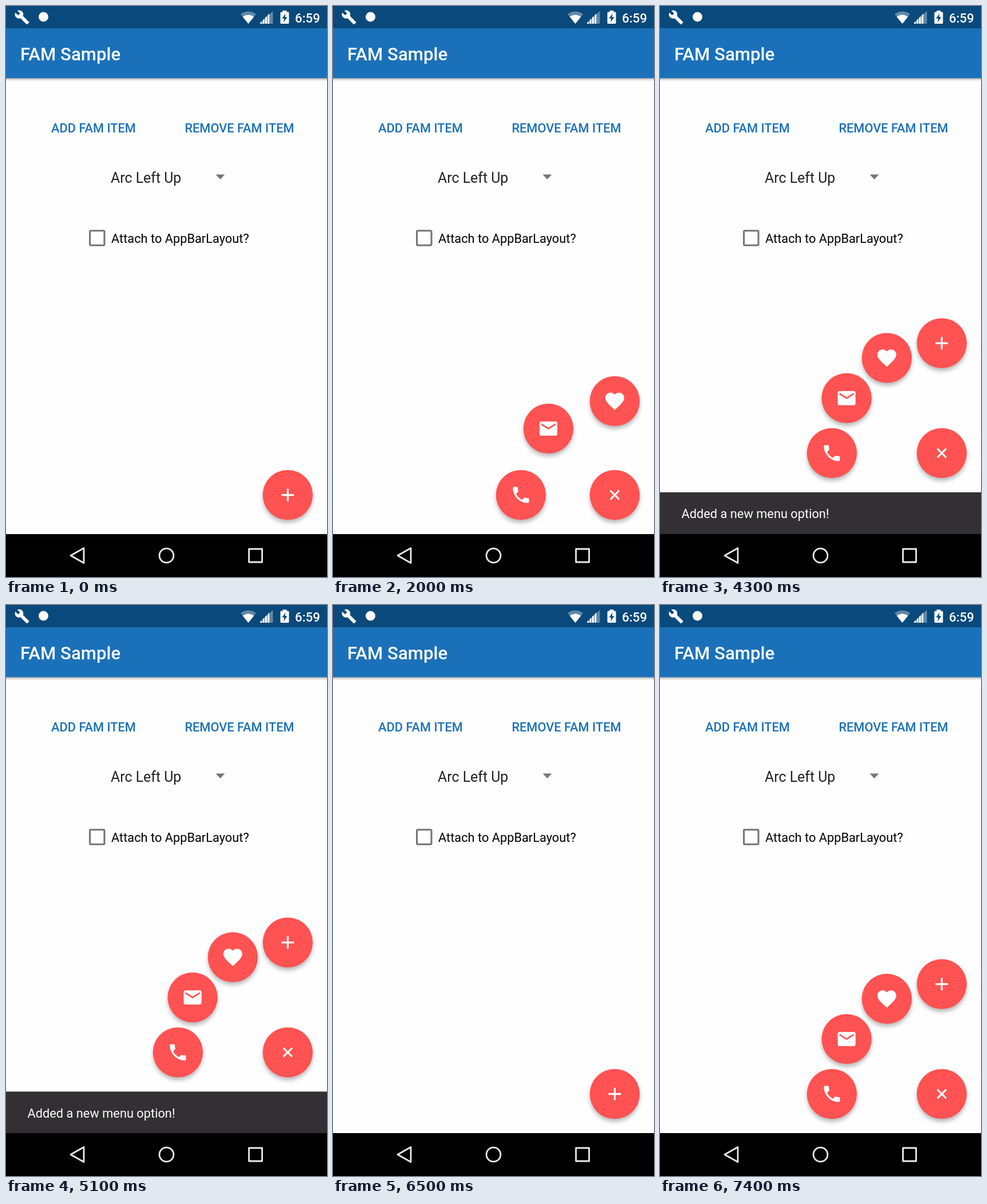
Write an HTML page that moves like this. It is 561 px wide and 998 px high and loops after 8 s.

```html
<!DOCTYPE html>
<html lang="en">
<head>
<meta charset="utf-8">
<title>FAM Sample</title>
<style>
  html, body { margin: 0; width: 100%; height: 100%; overflow: hidden; background: #fefefe; }
  svg { display: block; width: 100%; height: 100%; }
  text { font-family: Roboto, "Noto Sans", sans-serif; font-size: 21.8px; }
  .medium { font-weight: 500; }
  .action { font-weight: 500; fill: #1b71b9; text-anchor: middle; }
  .fab { filter: drop-shadow(0 5px 3.5px rgba(0, 0, 0, .27)); }
  .fab circle { fill: #ff5252; }
  .fab path { fill: #fff; }
</style>
</head>
<body>
<svg viewBox="0 0 561 998">
  <defs>
    <linearGradient id="shade" x2="0" y2="1">
      <stop stop-color="#000" stop-opacity=".36"/>
      <stop offset=".45" stop-color="#000" stop-opacity=".13"/>
      <stop offset="1" stop-color="#000" stop-opacity="0"/>
    </linearGradient>
    <path id="plus" d="M19 13h-6v6h-2v-6H5v-2h6V5h2v6h6z"/>
    <path id="heart" d="M12 21.35l-1.45-1.32C5.4 15.36 2 12.28 2 8.5 2 5.42 4.42 3 7.5 3c1.74 0 3.41.81 4.5 2.09C13.09 3.81 14.76 3 16.5 3 19.58 3 22 5.42 22 8.5c0 3.78-3.4 6.86-8.55 11.54z"/>
    <path id="mail" d="M20 4H4c-1.1 0-2 .9-2 2v12c0 1.1.9 2 2 2h16c1.1 0 2-.9 2-2V6c0-1.1-.9-2-2-2zm0 4l-8 5-8-5V6l8 5 8-5z"/>
    <path id="phone" d="M6.62 10.79c1.44 2.83 3.76 5.14 6.59 6.59l2.2-2.2c.27-.27.67-.36 1.02-.24 1.12.37 2.33.57 3.57.57.55 0 1 .45 1 1V20c0 .55-.45 1-1 1C10.61 21 3 13.39 3 4c0-.55.45-1 1-1h3.5c.55 0 1 .45 1 1 0 1.25.2 2.45.57 3.57.11.35.03.74-.25 1.02z"/>
  </defs>

  <rect width="561" height="998" fill="#fefefe"/>

  <!-- App bar -->
  <rect y="126" width="561" height="6" fill="url(#shade)"/>
  <rect width="561" height="126" fill="#1b71b9"/>
  <text class="medium" x="25" y="95" fill="#fff" style="font-size:31.2px">FAM Sample</text>

  <!-- Status bar -->
  <rect width="561" height="39" fill="#0a497b"/>
  <g fill="#fff">
    <path transform="translate(14.4 6.2) scale(1.13)" d="M22.7 19l-9.1-9.1c.9-2.3.4-5-1.5-6.9-2-2-5-2.4-7.4-1.3L9 6 6 9 1.6 4.7C.4 7.1.9 10.1 2.9 12.1c1.9 1.9 4.6 2.4 6.9 1.5l9.1 9.1c.4.4 1 .4 1.4 0l2.3-2.3c.5-.4.5-1.1.1-1.4z"/>
    <circle cx="65.5" cy="19" r="8.5"/>
    <g transform="translate(409.6 6.1) scale(1.16)">
      <path opacity=".35" d="M12 21.5L23.64 7C23.2 6.66 18.7 3 12 3S.8 6.66.36 7z"/>
      <path d="M3.53 10.95L12 21.5l8.47-10.55C20.04 10.62 16.8 8 12 8s-8.04 2.62-8.47 2.95z"/>
    </g>
    <path id="traffic" fill="#5c6f7e" d="M417.5 18.5l6-7 6 7zM417.5 21.5h12l-6 7z"/>
    <path opacity=".35" d="M444 31L466.5 8.5V31z"/>
    <path d="M444 31v-1.5l3-3V31zM448.4 31v-6l3-3v9zM452.8 31V20.6l3-3V31zM457.2 31V16.2l3-3V31z"/>
    <path d="M483.5 8h7v2.5h2.5q1.5 0 1.5 1.5v17.5q0 1.5-1.5 1.5h-12q-1.5 0-1.5-1.5V12q0-1.5 1.5-1.5h2.5z"/>
    <path fill="#0a497b" d="M488.6 13l-6.2 8.8h3.8l-1 6.7 6.4-9.3h-4z"/>
    <text class="medium" x="505" y="28.5" style="font-size:22.3px">6:59</text>
  </g>

  <!-- Controls -->
  <text class="action" x="153" y="220.5">ADD FAM ITEM</text>
  <text class="action" x="408" y="220.5">REMOVE FAM ITEM</text>
  <text x="183" y="309" fill="#212121" style="font-size:24.9px">Arc Left Up</text>
  <path d="M366.5 294.5h16l-8 8.5z" fill="#757575"/>
  <rect x="146.6" y="392.8" width="25.4" height="25.4" rx="1.5" fill="none" stroke="#757575" stroke-width="3.1"/>
  <text x="184" y="414" fill="#000">Attach to AppBarLayout?</text>

  <g id="menu"></g>

  <!-- Snackbar -->
  <g id="snack">
    <rect y="850" width="561" height="73.5" fill="#323033"/>
    <text id="note" x="37.5" y="895.3" fill="#fff">Added a new menu option!</text>
  </g>

  <!-- Navigation bar -->
  <rect y="923" width="561" height="75"/>
  <g fill="none" stroke="#ececec" stroke-width="2.8" stroke-linejoin="round">
    <path d="M113 960.5l23-13v26z"/>
    <circle cx="280.5" cy="960.5" r="12.4"/>
    <rect x="424.6" y="949" width="23" height="23"/>
  </g>
</svg>

<script>
const LOOP = 8000, TICK = 100;
const HOME = { x: 492.4, y: 854.6 };
const SNACK_HEIGHT = 73.2;
const SMALL_ARC = 164, LARGE_ARC = 192;
const byId = id => document.getElementById(id);

function makeFab(icon) {
  const fab = document.createElementNS('http://www.w3.org/2000/svg', 'g');
  fab.setAttribute('class', 'fab');
  fab.innerHTML = '<circle r="43.7"/>';
  const glyph = document.createElementNS('http://www.w3.org/2000/svg', 'g');
  const shape = byId(icon).cloneNode();
  shape.removeAttribute('id');
  shape.setAttribute('transform', `scale(${icon === 'heart' ? 1.65 : 1.558}) translate(-12 -12)`);
  glyph.append(shape);
  fab.append(glyph);
  byId('menu').append(fab);
  return { fab, glyph };
}

const items = ['phone', 'mail', 'heart', 'plus'].map(makeFab);
const main = makeFab('plus');

const span = (t, start, length) => Math.min(1, Math.max(0, (t - start) / length));
const mix = (a, b, k) => a + (b - a) * k;
const smooth = k => (1 - Math.cos(Math.PI * k)) / 2;
const overshoot = k => (k - 1) ** 2 * (3 * (k - 1) + 2) + 1;

// Cubic Bézier (.4, 0, .2, 1), solved for x by bisection.
function standard(x) {
  let lo = 0, hi = 1, u = x;
  for (let i = 0; i < 24; i++) {
    u = (lo + hi) / 2;
    const at = 1.2 * u * (1 - u) ** 2 + .6 * u * u * (1 - u) + u ** 3;
    if (at < x) lo = u; else hi = u;
  }
  return u * u * (3 - 2 * u);
}

function openness(t) {
  if (t < 5950) return overshoot(span(t, 450, 400));
  if (t < 6950) return 1 - smooth(span(t, 5950, 500));
  return overshoot(span(t, 6950, 400));
}

function turn(t) {
  return smooth(span(t, 450, 400)) - smooth(span(t, 5950, 500)) + smooth(span(t, 6950, 400));
}

function place(fab, x, y) {
  fab.setAttribute('transform', `translate(${x.toFixed(2)} ${y.toFixed(2)})`);
}

function draw(t) {
  const open = openness(t);
  const shown = standard(span(t, 2090, 250)) - standard(span(t, 5087, 250));
  const regroup = smooth(span(t, 2050, 400));
  const y = HOME.y - SNACK_HEIGHT * shown;

  items.forEach(({ fab }, i) => {
    const added = i === 3;
    const angle = mix(Math.min(i, 2) * 45, i * 30, regroup) * Math.PI / 180;
    const radius = open * mix(added ? 0 : SMALL_ARC, LARGE_ARC, regroup);
    place(fab, HOME.x - radius * Math.cos(angle), y - radius * Math.sin(angle));
    fab.style.display = radius > .01 ? '' : 'none';
  });

  place(main.fab, HOME.x, y);
  main.glyph.setAttribute('transform', `rotate(${45 * turn(t)})`);

  byId('snack').setAttribute('transform', `translate(0 ${SNACK_HEIGHT * (1 - shown)})`);
  byId('snack').style.display = shown > 0 ? '' : 'none';
  byId('note').style.opacity = shown;
  byId('traffic').style.display = t >= 2500 && t < 4300 ? '' : 'none';
}

// The screen refreshes ten times a second.
const began = performance.now();
function frame() {
  const t = (performance.now() - began) % LOOP;
  draw(Math.floor(t / TICK) * TICK);
  requestAnimationFrame(frame);
}
frame();
</script>
</body>
</html>
```
